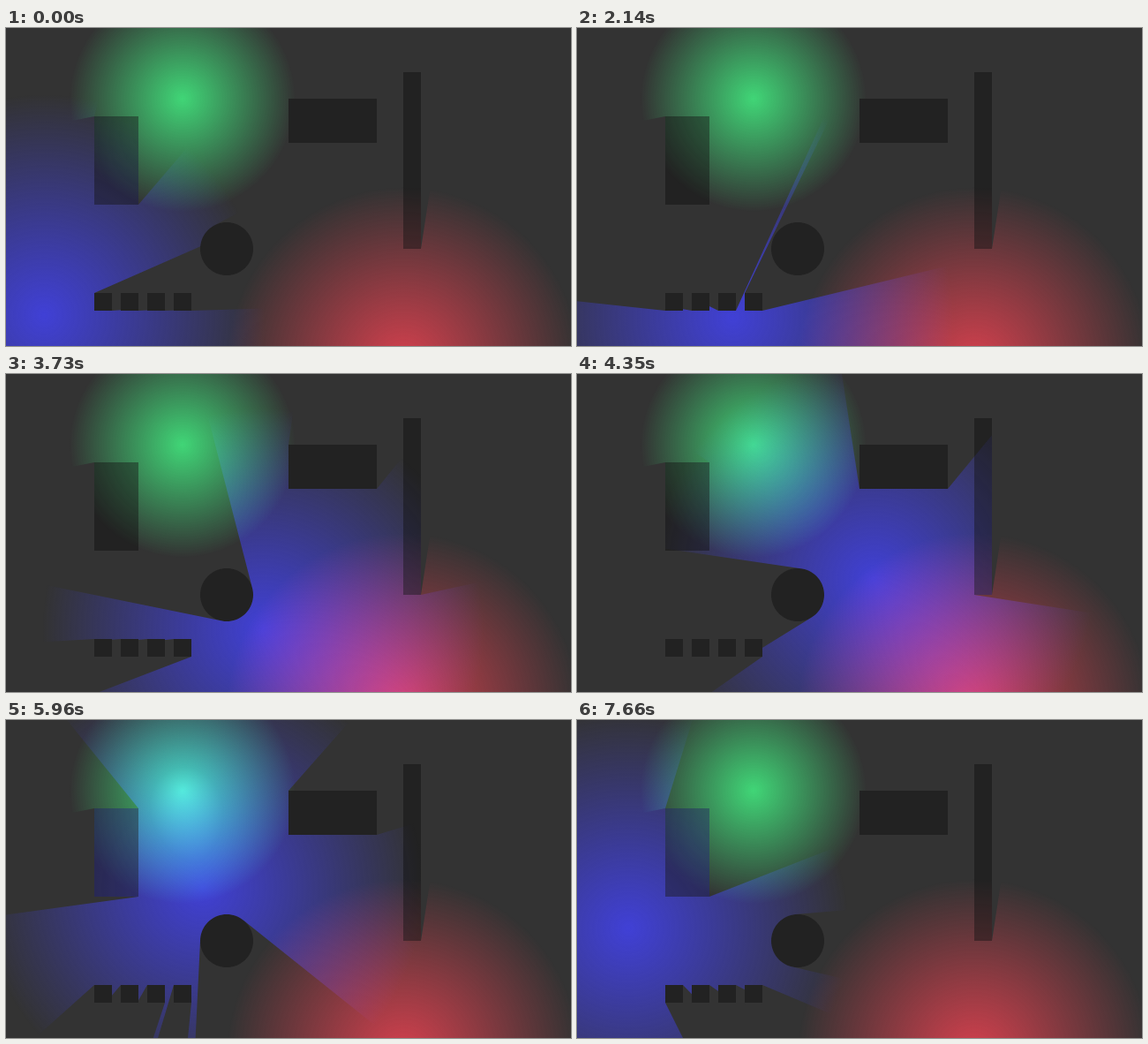
An HTML page with a canvas that plays this animation: 640x360 px, repeating every 7.71 s.

```html
<!DOCTYPE html>
<html>
<head>
<meta charset="utf-8">
<style>
html, body { margin: 0; width: 100%; height: 100%; overflow: hidden; background: #333; }
canvas { display: block; }
</style>
</head>
<body>
<canvas id="stage" width="640" height="360"></canvas>
<script>
const W = 640, H = 360, LOOP = 7710, LAST = 7660;
const ctx = document.getElementById('stage').getContext('2d');

function layer() {
  const c = document.createElement('canvas');
  c.width = W;
  c.height = H;
  return c.getContext('2d');
}

// Bodies: clockwise points, and the share of light that tints their surface
function rect(x, y, w, h, tint = 0) {
  return { pts: [[x, y], [x + w, y], [x + w, y + h], [x, y + h]], tint };
}

function disc(x, y, r) {
  const n = 72, pts = [];
  for (let i = 0; i < n; i++) {
    const a = i / n * 2 * Math.PI;
    pts.push([x + r * Math.cos(a), y + r * Math.sin(a)]);
  }
  return { pts, tint: 0 };
}

const bodies = [
  rect(100, 100, 50, 100, 0.55),
  rect(450, 50, 20, 200, 0.55),
  rect(320, 80, 100, 50),
  disc(250, 250, 30),
  ...[100, 130, 160, 190].map(x => rect(x, 300, 20, 20))
];

const green = { x: 200, y: 80, reach: 128, rgb: '68,255,136' };
const red = { x: 450, y: 380, reach: 200, rgb: '255,68,85' };
const blue = { x: 0, y: 0, reach: 250, rgb: '68,68,255' };

// Path of the blue lamp: time, x, y
const path = [
  [0, 43, 325], [1410, 127, 328], [2760, 220, 323], [3730, 291, 289],
  [4300, 335, 237], [4950, 315, 181], [5960, 223, 190], [LAST, 58, 236]
];

function slope(i, k) {
  const a = path[Math.max(i - 1, 0)], b = path[Math.min(i + 1, path.length - 1)];
  return (b[k] - a[k]) / (b[0] - a[0]);
}

function along(t, k) {
  let i = 0;
  while (i < path.length - 2 && t > path[i + 1][0]) i++;
  const a = path[i], b = path[i + 1], d = b[0] - a[0];
  const u = (t - a[0]) / d, v = 1 - u;
  return v * v * (1 + 2 * u) * a[k] + u * u * (3 - 2 * u) * b[k] +
    u * v * d * (v * slope(i, k) - u * slope(i + 1, k));
}

function trace(g, pts) {
  pts.forEach((p, i) => i ? g.lineTo(p[0], p[1]) : g.moveTo(p[0], p[1]));
  g.closePath();
}

function castShadow(g, lamp, body) {
  const far = p => [p[0] + (p[0] - lamp.x) * 60, p[1] + (p[1] - lamp.y) * 60];
  g.fillStyle = '#000';
  g.beginPath();
  body.pts.forEach((a, i) => {
    const b = body.pts[(i + 1) % body.pts.length];
    const side = (b[0] - a[0]) * (lamp.y - a[1]) - (b[1] - a[1]) * (lamp.x - a[0]);
    if (side > 0) trace(g, [a, far(a), far(b), b]);
  });
  if (!body.tint) trace(g, body.pts);
  g.fill();
  if (body.tint) {
    g.fillStyle = `rgba(0,0,0,${1 - body.tint})`;
    g.beginPath();
    trace(g, body.pts);
    g.fill();
  }
}

function shine(g, lamp) {
  g.globalCompositeOperation = 'source-over';
  g.clearRect(0, 0, W, H);
  const glow = g.createRadialGradient(lamp.x, lamp.y, 0, lamp.x, lamp.y, lamp.reach);
  glow.addColorStop(0, `rgba(${lamp.rgb},0.8)`);
  glow.addColorStop(1, `rgba(${lamp.rgb},0)`);
  g.fillStyle = glow;
  g.fillRect(0, 0, W, H);
  g.globalCompositeOperation = 'destination-out';
  bodies.forEach(b => castShadow(g, lamp, b));
}

const scene = layer(), fixed = layer(), beam = layer(), sum = layer();

scene.fillStyle = '#333';
scene.fillRect(0, 0, W, H);
scene.fillStyle = '#222';
bodies.forEach(b => {
  scene.beginPath();
  trace(scene, b.pts);
  scene.fill();
});

fixed.globalCompositeOperation = 'lighter';
[green, red].forEach(lamp => {
  shine(beam, lamp);
  fixed.drawImage(beam.canvas, 0, 0);
});

function draw(t) {
  blue.x = along(t, 1);
  blue.y = along(t, 2);
  shine(beam, blue);
  sum.globalCompositeOperation = 'copy';
  sum.drawImage(fixed.canvas, 0, 0);
  sum.globalCompositeOperation = 'lighter';
  sum.drawImage(beam.canvas, 0, 0);
  ctx.drawImage(scene.canvas, 0, 0);
  ctx.drawImage(sum.canvas, 0, 0);
}

const start = performance.now();
function tick() {
  draw(Math.min((performance.now() - start) % LOOP, LAST));
  requestAnimationFrame(tick);
}
tick();
</script>
</body>
</html>
```
